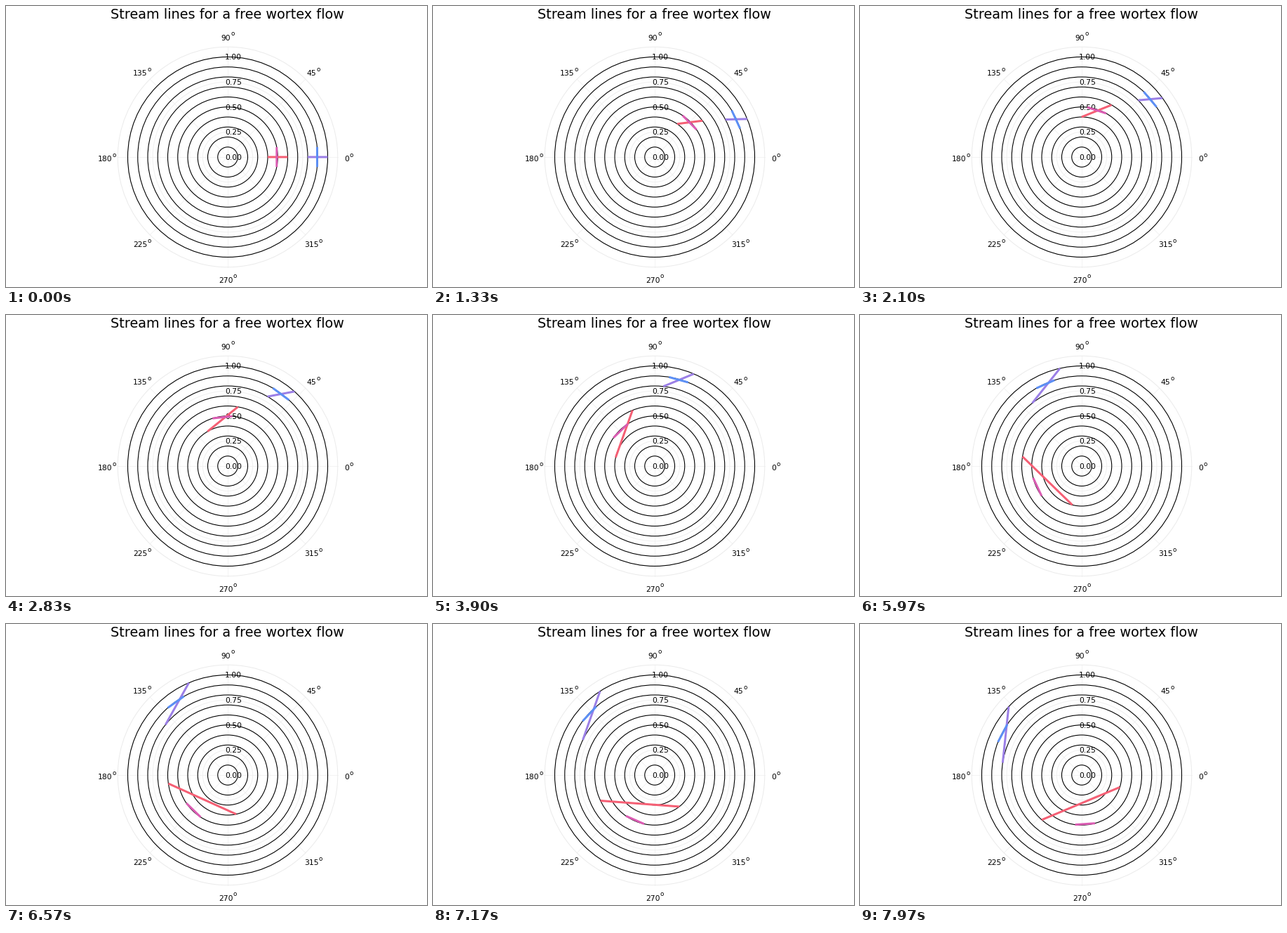
These frames come from a looping animation (600x400 px, 8 s). A matplotlib script:

```python
import numpy as np
import matplotlib.pyplot as plt
from matplotlib.animation import FuncAnimation
from matplotlib.patches import Circle

W, H, DPI = 600, 400, 100
FRAMES, LOOP = 240, 8000
CX, CY, UNIT = 316, 215, 142.5
RIM = 1.1 * UNIT
PT = 72 / DPI  # points per pixel
TICK, SUP = 10.8, 8.8

plt.rcParams["font.family"] = "DejaVu Sans"

fig = plt.figure(figsize=(W / DPI, H / DPI), dpi=DPI, facecolor="white")
ax = fig.add_axes([0, 0, 1, 1])
ax.set_xlim(0, W)
ax.set_ylim(H, 0)
ax.axis("off")


def polar(r, angle):
    return CX + r * np.cos(angle), CY - r * np.sin(angle)


def ring(r, color, width, z):
    ax.add_patch(Circle((CX, CY), r, fill=False, ec=color, lw=width * PT, zorder=z))


def label(x, y, text, size, ha="center"):
    ax.text(x, y, text, fontsize=size * PT, ha=ha, va="baseline",
            color="black", zorder=3)


def angle_label(deg):
    text = str(deg)
    x, y = polar(1.1 * RIM, np.radians(deg))
    digits = 0.636 * TICK * len(text)
    left = x - (digits + 0.612 * SUP) / 2
    label(left, y + 6.2, text, TICK, "left")
    label(left + digits, y - 0.4, "o", SUP, "left")


label(CX - 0.5, 18, "Stream lines for a free wortex flow", 19.3)

for deg in range(0, 360, 45):
    x, y = polar(RIM, np.radians(deg))
    ax.plot([CX, x], [CY, y], color="#f2f2f2", lw=0.9 * PT, zorder=1)
    angle_label(deg)

for tick in np.arange(0, 1.01, 0.25):
    if tick:
        ring(tick * UNIT, "#f0f0f0", 1, 1)
    label(CX + 0.05 * RIM, CY - tick * UNIT + 4, f"{tick:.2f}", TICK)
ring(RIM, "#ebebeb", 1, 1)

for k in range(1, 11):
    ring(k / 10 * UNIT, "black", 1.1, 4)

# Each bar: colour, radii of its two ends, starting angles of its two ends
BARS = [
    ("#f55f74", (0.4, 0.6), (0, 0)),
    ("#db5cb3", (0.5, 0.5), (-0.2, 0.2)),
    ("#9b7fe6", (0.8, 1.0), (0, 0)),
    ("#5c8ff5", (0.9, 0.9), (-1 / 9, 1 / 9)),
]
bars = []
for color, radii, start in BARS:
    line, = ax.plot([], [], color=color, lw=3 * PT, zorder=5,
                    solid_capstyle="butt", snap=False)
    bars.append((line, np.array(radii), np.array(start)))


def update(n):
    for line, r, start in bars:
        line.set_data(*polar(r * UNIT, start + 0.01 * n / r))
    return [line for line, _, _ in bars]


anim = FuncAnimation(fig, update, frames=FRAMES, interval=LOOP / FRAMES,
                     init_func=lambda: update(0), repeat=True, repeat_delay=0)
plt.show()
```
